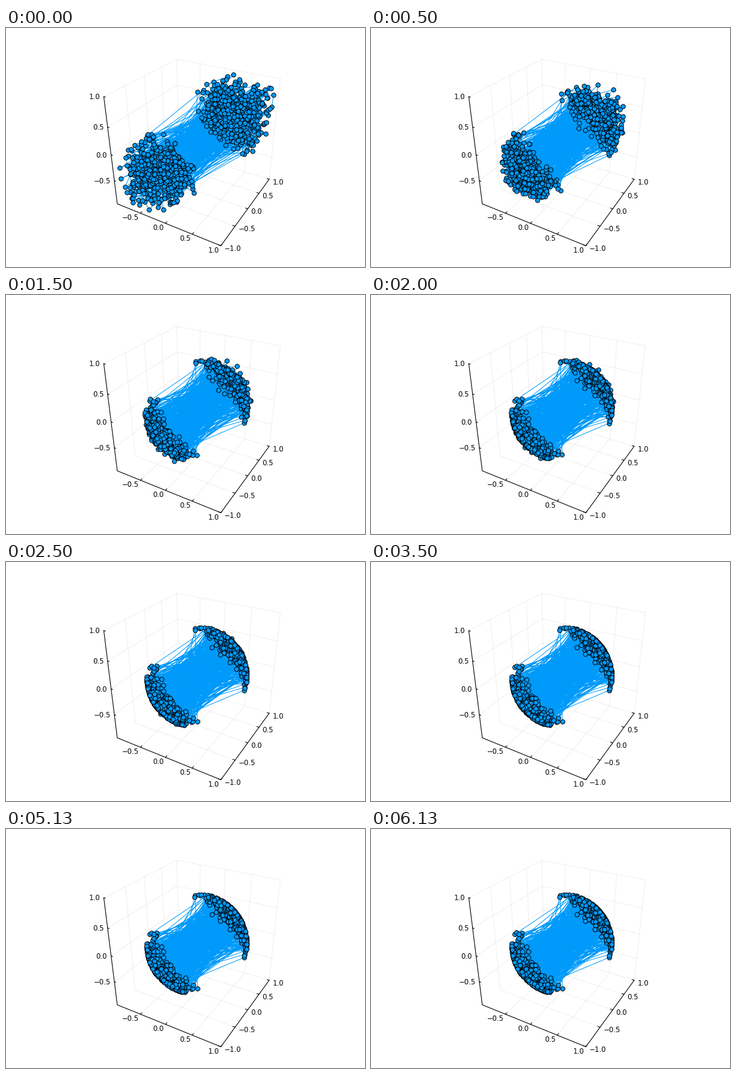
Recreate the animation shown at these times as a matplotlib script. Size 600x400 px, loop 6260 ms.

```python
import numpy as np
import matplotlib.pyplot as plt
from matplotlib.animation import FuncAnimation

WIDTH, HEIGHT, DPI = 600, 400, 100
FRAMES, INTERVAL = 50, 125.2
PX = 72 / DPI                      # one pixel in points
BLUE = "#009afa"

# Perspective camera looking at the cube [-1, 1]^3
AZIMUTH, POLAR = np.radians([-60, 60])
TOWARD = np.array([np.sin(POLAR) * np.cos(AZIMUTH),
                   np.sin(POLAR) * np.sin(AZIMUTH), np.cos(POLAR)])
RIGHT = np.array([-np.sin(AZIMUTH), np.cos(AZIMUTH), 0])
UP = np.cross(TOWARD, RIGHT)
DISTANCE = np.sqrt(3) / np.sin(np.radians(15))
CENTER, SCALE = np.array([318.5, 192.5]), 667


def project(points):
    points = np.asarray(points, float)
    depth = DISTANCE - points @ TOWARD
    x = CENTER[0] + SCALE * (points @ RIGHT) / depth
    y = CENTER[1] - SCALE * (points @ UP) / depth
    return np.stack([x, y], axis=-1)


fig = plt.figure(figsize=(WIDTH / DPI, HEIGHT / DPI), dpi=DPI, facecolor="white")
ax = fig.add_axes([0, 0, 1, 1])
ax.set_xlim(0, WIDTH)
ax.set_ylim(HEIGHT, 0)
ax.axis("off")


def segment(*points, **style):
    ax.plot(*project(points).T, **style)


def label(tick, value, dx, dy, align):
    x, y = project(tick)
    ax.text(x + dx, y + dy + 4.2, f"{value:.1f}".replace("-", "\u2212"), ha=align,
            va="baseline", family="DejaVu Sans", size=11.6 * PX)


def to_cube(value, low):
    """Map an axis running from low to 1 onto [-1, 1]."""
    return 2 * (value - low) / (1 - low) - 1


def draw_box():
    grid = dict(color="black", alpha=0.075, lw=0.9 * PX, zorder=1)
    edge = dict(color="black", lw=1.1 * PX, zorder=2)
    for value in (-1, -0.5, 0, 0.5, 1):
        x, y, z = to_cube(value, -0.995), value, to_cube(value, -0.98)
        segment((-1, y, 1), (-1, y, -1), (1, y, -1), **grid)
        segment((1, y, -1), (0.96, y, -1), **edge)
        label((1, y, -1), value, 5.5, 4.5, "left")
        if value > -1:
            segment((x, 1, 1), (x, 1, -1), (x, -1, -1), **grid)
            segment((-1, -1, z), (-1, 1, z), (1, 1, z), **grid)
            segment((x, -1, -1), (x, -0.96, -1), **edge)
            segment((-1, -1, z), (-0.97, -1, z), **edge)
            label((x, -1, -1), value, -2.7, 7, "right")
            label((-1, -1, z), value, -6.5, 0.3, "right")
    segment((-1, -1, 1), (-1, -1, -1), (1, -1, -1), (1, 1, -1), **edge)


# Chain of points in two opposite octants, each relaxing onto a sphere
COUNT, RADIUS = 900, 0.835
rng = np.random.default_rng(11)
start = 0.95 * rng.random((COUNT, 3)) + rng.normal(0, 0.03, (COUNT, 3))
start_radius = np.linalg.norm(start, axis=1)
direction = start / start_radius[:, None]
start_radius = np.maximum(start_radius, 0.45)
side = rng.choice([-1, 1], COUNT)
drift = rng.normal(0, 0.05, (COUNT, 3))

# Inner points settle fastest, outer ones later, and a few lag behind
spread = np.exp(rng.normal(0, 0.35, COUNT))
rate = np.where(start_radius < RADIUS, 2.2, 0.7) * spread
pull = 0.75 * spread
laggard = rng.random(COUNT) < 0.03
rate[laggard], pull[laggard] = 0.05, 0.35


def chain(t):
    decay = np.exp(-rate * t - pull * t ** 2)
    radius = RADIUS / np.sqrt(1 + (RADIUS ** 2 / start_radius ** 2 - 1) * decay)
    heading = direction + drift * (1 - np.exp(-t))
    heading /= np.linalg.norm(heading, axis=1)[:, None]
    return project(heading * (radius * side)[:, None])


draw_box()
links, = ax.plot([], [], color=BLUE, lw=PX, zorder=3)
dots, = ax.plot([], [], "o", ms=7.4 * PX, mfc=BLUE, mec="black", mew=PX, zorder=4)


def update(frame):
    xy = chain(frame * INTERVAL / 1000)
    links.set_data(*xy.T)
    dots.set_data(*xy.T)
    return links, dots


anim = FuncAnimation(fig, update, frames=FRAMES, interval=INTERVAL,
                     repeat=True, repeat_delay=0, blit=False)
plt.show()
```
